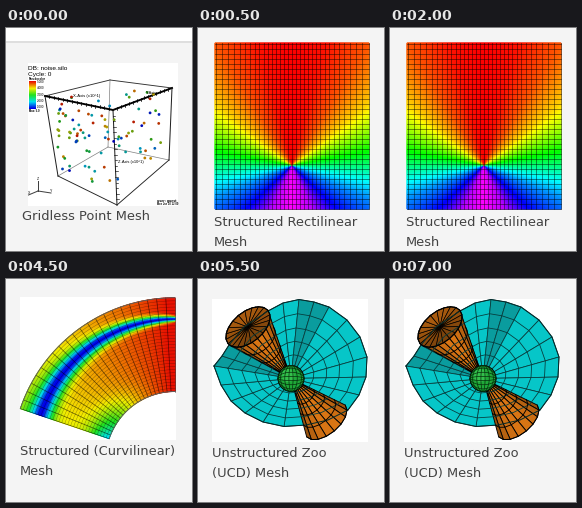
Recreate the animation shown at these times as a matplotlib script. Size 186x223 px, loop 8000 ms.

```python
import numpy as np
import matplotlib.pyplot as plt
from matplotlib.animation import FuncAnimation
from matplotlib.colors import LinearSegmentedColormap, hsv_to_rgb
from matplotlib.patches import Circle, Polygon, Rectangle

W, H, DPI = 186, 223, 100
STEP = 500          # ms per frame
STARTS = [0, 500, 3000, 5500]
PX = 72 / DPI       # points per pixel

hot = LinearSegmentedColormap.from_list(
    "hot_cold", ["#0000e8", "#00e0f0", "#20e020", "#f4ee00", "#e81000"])
wheel = LinearSegmentedColormap.from_list(
    "wheel", [hsv_to_rgb((h / 360, 1, 1)) for h in range(0, 301, 15)])

fig = plt.figure(figsize=(W / DPI, H / DPI), dpi=DPI, facecolor="#f4f4f4")


def scene():
    ax = fig.add_axes([0, 0, 1, 1])
    ax.set(xlim=(0, W), ylim=(H, 0))
    ax.axis("off")
    return ax


def rect(ax, x0, y0, x1, y1, color):
    ax.add_patch(Rectangle((x0, y0), x1 - x0, y1 - y0, fc=color, lw=0))


def line(ax, pts, width=0.8, color="black", **kw):
    x, y = np.transpose(pts)
    return ax.plot(x, y, color=color, lw=width * PX, **kw)[0]


def poly(ax, pts, color, width=0.8, edge="black"):
    ax.add_patch(Polygon(pts, closed=True, fc=color, ec=edge, lw=width * PX,
                         joinstyle="round", zorder=2))


def text(ax, x, y, s, size, color="black", font="Liberation Sans", **kw):
    ax.text(x, y, s, fontsize=size * PX, color=color, family=font, **kw)


def caption(ax, x, y, *rows):
    for i, row in enumerate(rows):
        text(ax, x, y + 20 * i, row, 13, "#424242", "DejaVu Sans")


def point_mesh():
    ax = scene()
    rect(ax, 0, 0, W, 13, "white")
    rect(ax, 0, 13, W, 15, "#dedede")
    rect(ax, 22, 35, 172, 178, "white")
    text(ax, 22.5, 42, "DB: noise.silo", 6.5)
    text(ax, 22.5, 48, "Cycle: 0", 6.5)

    # legend
    text(ax, 23, 52, "Pseudocolor", 2.8, weight="bold")
    ramp = np.linspace(1, 0, 28)
    for i, v in enumerate(ramp):
        rect(ax, 23, 53 + i, 29.5, 54.2 + i, hot(v))
    for i in range(5):
        text(ax, 30.5, 55 + 6.3 * i, f"{5 - i}.000", 3)
    text(ax, 23, 84, "Max: 5.0", 2.8, weight="bold")

    # box corners in the order left, back, right, front
    top = np.array([(39, 68), (104, 52), (166, 60), (107, 82)], float)
    low = np.array([(52, 148), (102, 119), (163, 132), (111, 177)], float)
    for a, b in ((0, 1), (1, 2)):
        line(ax, (low[a], low[b]), 0.7, "#808080")
        line(ax, (top[a], top[b]), 0.9, "#303030")
    line(ax, (top[1], low[1]), 0.7, "#808080")

    # points scattered between the upper and lower silhouette of the box
    rng = np.random.default_rng(11)
    x = rng.uniform(50, 155, 90)
    upper = np.interp(x, top[:3, 0], top[:3, 1]) + 4
    lower = np.interp(x, low[[0, 3, 2], 0], low[[0, 3, 2], 1]) - 8
    y = upper + (lower - upper) * rng.beta(1.3, 1.6, 90)
    ax.scatter(x, y, s=(2.8 * PX) ** 2, marker="o", lw=0,
               c=hot(rng.uniform(0, 1, 90)) * [0.78, 0.68, 0.78, 1], zorder=3)

    for a, b in ((0, 3), (3, 2)):
        line(ax, (top[a], top[b]), 1.9)
        line(ax, (low[a], low[b]), 0.9, "#202020")
        for t in np.linspace(0.06, 0.94, 14):
            x, y = top[a] + t * (top[b] - top[a])
            line(ax, ((x, y - 1.8), (x, y + 1.2)), 0.7)
    for k in (0, 2, 3):
        line(ax, (top[k], low[k]), 1, "#202020")
    for t in np.linspace(0.06, 0.94, 16):
        x, y = top[3] + t * (low[3] - top[3])
        line(ax, ((x - 0.5, y), (x + 2, y)), 0.6)
    text(ax, 67, 69, "X-Axis (x10^1)", 4.2)
    text(ax, 112, 135, "Z-Axis (x10^1)", 4)
    text(ax, 140, 66, "Y-Axis", 4)

    # orientation triad
    for end, name in (((32, 153), "Z"), ((22.5, 167), "X"), ((45, 165), "Y")):
        line(ax, ((32, 163), end), 1, "#404040")
        text(ax, end[0] - 1, end[1] - 0.5, name, 3.5)
    text(ax, 151, 174, "user: guest", 3.6, weight="bold")
    text(ax, 151, 177.3, "Mon Jan 10 12:00", 2.5, weight="bold")
    caption(ax, 15.5, 192, "Gridless Point Mesh")
    return ax


def rectilinear_mesh():
    ax = scene()
    x0, x1, y0, y1 = 17, 171, 15, 181
    X, Y = np.meshgrid(np.linspace(x0, x1, 155), np.linspace(y0, y1, 167))
    angle = np.degrees(np.arctan2(np.abs(X - 94), 138 - Y))
    hue = np.interp(angle, [0, 15, 32, 51, 70, 85, 97, 113, 135, 155, 180],
                    [0, 4, 20, 50, 95, 135, 168, 205, 242, 284, 300])
    ax.pcolormesh(X, Y, hue, cmap=wheel, vmin=0, vmax=300, shading="gouraud")
    # columns crowd gently towards the middle
    u = np.linspace(-1, 1, 33)
    for x in 94 + 76.5 * (0.8 * u + 0.2 * u ** 3):
        line(ax, ((x, y0), (x, y1)), 0.7, alpha=0.62)
    for y in np.linspace(y0 + 0.5, y1 - 0.5, 34):
        line(ax, ((x0, y), (x1, y)), 0.7, alpha=0.62)
    caption(ax, 15.5, 198, "Structured Rectilinear", "Mesh")
    return ax


def curvilinear_mesh():
    ax = scene()
    rect(ax, 14, 18, 170, 161, "white")
    r_in, r_out, sweep = 69.5, 163.3, np.radians(71.3)

    def place(s, t):
        r = r_in + s * (r_out - r_in)
        a = np.pi / 2 + t * sweep
        return 169 + r * np.cos(a), 182 - r * np.sin(a)

    S, T = np.meshgrid(np.linspace(0, 1, 110), np.linspace(0, 1, 110))
    width = 0.022 + 0.1 * T ** 0.75
    peak = 1 - 0.27 * T ** 0.8 - 0.1 * T * (S > 0.775)
    field = peak * (1 - np.exp(-((S - 0.775) / width) ** 2))
    field -= 0.5 * T ** 2.5 * np.exp(-(S / 0.2) ** 2)
    X, Y = place(S, T)
    ax.pcolormesh(X, Y, field, cmap=hot, vmin=0, vmax=0.98, shading="gouraud")

    fine = np.linspace(0, 1, 80)
    for s in np.linspace(0, 1, 31):
        line(ax, np.transpose(place(s, fine)), 0.5, alpha=0.36)
    for t in np.linspace(0, 1, 23):
        line(ax, np.transpose(place(np.array([0, 1]), t)), 0.7, alpha=0.6)
    for s in (0, 1):
        line(ax, np.transpose(place(s, fine)), 0.9, "#606060")
    caption(ax, 13.5, 176, "Structured (Curvilinear)", "Mesh")
    return ax


def cone(ax, apex, centre, major, minor, cap):
    apex, centre = np.array(apex, float), np.array(centre, float)
    axis = (centre - apex) / np.hypot(*(centre - apex))
    side = np.array([-axis[1], axis[0]])

    def rim(a):
        return (centre + np.outer(np.cos(a), axis) * minor
                + np.outer(np.sin(a), side) * major)

    def tone(k):
        return np.array([0.87, 0.47, 0.08]) * k

    arc = rim(np.linspace(-np.pi / 2, np.pi / 2, 9))
    for i in range(8):
        shade = 0.62 + 0.36 * np.sin(np.pi * (i + 0.5) / 8)
        poly(ax, (apex, arc[i], arc[i + 1]), tone(shade), 0.9)
    if cap:
        ring = rim(np.linspace(0, 2 * np.pi, 21))
        inner = rim(np.linspace(np.pi / 2, 1.5 * np.pi, 12))
        for k in (0.5, 0.75):
            line(ax, apex + k * (inner - apex), 0.9, zorder=3)
        for i in range(20):
            shade = 0.66 + 0.1 * np.cos(2 * np.pi * i / 20)
            poly(ax, (centre, ring[i], ring[i + 1]), tone(shade), 0.7)
        line(ax, ring, 1.2, zorder=4)
    else:
        for k in (0.42, 0.6, 0.8, 1):
            line(ax, apex + k * (arc - apex), 0.9, zorder=3)


def zoo_mesh():
    ax = scene()
    rect(ax, 14, 20, 170, 163, "white")
    hub = np.array([93, 99.5])
    edge = np.array([
        (16, 87), (24, 77), (31, 66), (46, 48), (70, 32), (85, 24), (101, 20.5),
        (116, 23), (131, 28), (149, 41), (162, 58), (169, 78), (168, 98),
        (161, 116), (150, 131), (130, 141), (108, 146), (86, 147.5), (65, 143),
        (47, 134), (33, 122), (23, 106)], float)
    dark = {0, 1, 6, 7}
    n = len(edge)
    for i in range(n):
        color = "#0a9c9e" if i in dark else "#06c6c8"
        poly(ax, (hub, edge[i], edge[(i + 1) % n]), color, 0.8, "#063c3c")
    loop = np.vstack([edge, edge[:1]])
    for k in (0.3, 0.47, 0.64, 0.82):
        line(ax, hub + k * (loop - hub), 0.8, "#063c3c", zorder=2.5)
    line(ax, loop, 1, "#042c2c", zorder=2.5)

    cone(ax, hub, (50, 48), 26, 15, True)
    cone(ax, hub, (128, 142), 25, 13, False)

    # meshed ball in the middle
    radius = 13
    ball = Circle(hub, radius, fc="#1fa838", ec="black", lw=PX, zorder=5)
    ax.add_patch(ball)
    glow = Circle(hub - 3, 6.5, fc="#42d058", lw=0, alpha=0.6, zorder=5.1)
    ax.add_patch(glow)
    a = np.linspace(-np.pi / 2, np.pi / 2, 24)
    for k in np.linspace(-0.8, 0.8, 6):
        bend = radius * k * np.cos(a)
        run = radius * np.sin(a)
        for x, y in ((bend, run), (run, bend)):
            line(ax, np.transpose((hub[0] + x, hub[1] + y)), 0.7,
                 "#04300c", zorder=5.2)
    caption(ax, 14, 178, "Unstructured Zoo", "(UCD) Mesh")
    return ax


scenes = [point_mesh(), rectilinear_mesh(), curvilinear_mesh(), zoo_mesh()]


def update(frame):
    shown = sum(frame * STEP >= t for t in STARTS) - 1
    for i, ax in enumerate(scenes):
        ax.set_visible(i == shown)
    return scenes


update(0)
anim = FuncAnimation(fig, update, frames=16, interval=STEP, repeat=True,
                     repeat_delay=0, blit=False)
plt.show()
```
